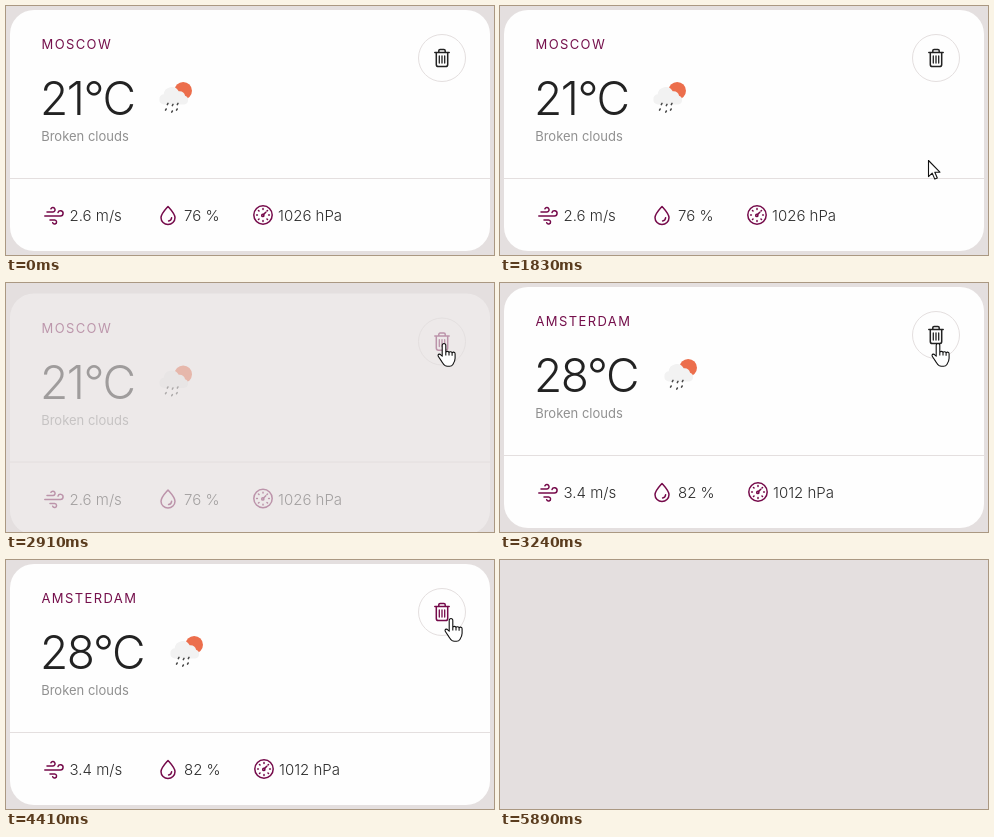
Write an HTML page that moves like this. It is 488 px wide and 249 px high and loops after 6350 ms.

```html
<!DOCTYPE html>
<html lang="en">
<head>
<meta charset="utf-8">
<title>Weather card</title>
<style>
  html, body { margin: 0; width: 100%; height: 100%; overflow: hidden; background: #e4dfdf; }
  svg { display: block; width: 488px; height: 249px; }
  text { font-family: Inter, "Liberation Sans", sans-serif; white-space: pre; }
  .city { font-size: 13px; letter-spacing: 1.4px; fill: #75104c; }
  .temp { font-size: 46px; font-weight: 300; letter-spacing: -1.4px; fill: #222; }
  .sky { font-size: 13px; fill: #909090; }
  .stat { font-size: 15px; font-weight: 300; fill: #2c2c2c; }
  .line { fill: none; stroke-width: 1.5; stroke-linecap: round; stroke-linejoin: round; }
  .plum { stroke: #750a4a; }
  .cursor { stroke: #111; stroke-width: 1.1; fill: #fff; stroke-linejoin: round; }
</style>
</head>
<body>
<svg viewBox="0 0 488 249" xmlns="http://www.w3.org/2000/svg">
  <g id="card">
    <rect x="4" y="4" width="480" height="241" rx="24" fill="#fefefe"/>
    <path d="M4 172.5H484" stroke="#e4dfdf"/>
    <text class="city" id="city" x="35.5" y="43"></text>
    <text class="temp" id="temp" x="34" y="109.3"></text>
    <text class="sky" x="35.2" y="135"></text>

    <g id="weather">
      <circle cx="177.2" cy="84.8" r="8.8" fill="#ec6e4c"/>
      <path fill="#f2f2f2" d="M158 98.5a5.2 5.2 0 0 1-.3-10.3a8 8 0 0 1 15-3
        a6 6 0 0 1 6.4 4.6a4.5 4.5 0 0 1-.9 8.7z"/>
      <path class="line" stroke="#484848" id="rain"/>
    </g>

    <g class="line plum">
      <path d="M41 206H47a2.2 2.2 0 1 0-2.1-3.2M38.8 210H54.5a2.6 2.6 0 1 0-2.5-3.4
        M44 214H48.6a2 2 0 1 1-1.9 2.7"/>
      <path d="M162 200.5c-3.2 3.6-7 7.4-7 11.3a7 6.7 0 0 0 14 0c0-3.9-3.8-7.7-7-11.3z
        M165.6 211.8a3.6 3.6 0 0 1-3 3.2"/>
      <g id="gauge">
        <circle cx="257" cy="209" r="9.2"/>
        <path id="ticks"/>
        <path d="M257.6 208.4L259.8 206.2"/>
        <circle cx="256.8" cy="209.4" r="1.1"/>
      </g>
    </g>
    <text class="stat" id="wind" x="63.5" y="215"></text>
    <text class="stat" id="humid" x="178" y="215"></text>
    <text class="stat" id="press" y="215"></text>

    <circle cx="436" cy="52" r="23.5" fill="none" stroke="#e4dfdf"/>
    <g class="line" id="bin">
      <path d="M428.8 46.5H443.2M432.8 46.3V44.8a1.3 1.3 0 0 1 1.3-1.3H437.9a1.3 1.3 0 0 1 1.3 1.3V46.3
        M430.3 46.5V58.4a2.2 2.2 0 0 0 2.2 2.2H439.5a2.2 2.2 0 0 0 2.2-2.2V46.5"/>
      <path d="M433.3 50V57M436 50V57M438.7 50V57" stroke-width="1.3"/>
    </g>
  </g>

  <path class="cursor" id="arrow" d="M.5 .5V16.6L4.2 13.1L6.8 19.1L9.3 18L6.8 12.2H11.9z"/>
  <path class="cursor" id="hand" d="M0 .5c-1.1 0-1.8.8-1.8 1.9V13.2L-3.2 11.8c-.9-1-2.3-.9-2.7.1
    c-.3.8.1 1.4.6 2.1L-2.2 18.6c1 1.4 1.5 2.6 3 3.8c.8.6 1.6.9 2.6.9H5.6c1.4 0 2.5-.6 3.3-1.8
    c1.2-1.8 2.2-3.6 2.2-6.2V10.7c0-2-2.7-2.1-3-.5c-.1-1.8-2.8-2-3.1-.5c-.2-1.7-2.9-1.8-3.2-.2V2.4
    C1.8 1.3 1.1.5 0 .5z M1.8 9.2V12.4M5 9.7V12.6M8.1 10.2V12.8"/>
</svg>
<script>
const LOOP = 6350;
const $ = id => document.getElementById(id);
const clamp = v => Math.min(1, Math.max(0, v));
const easeOut = p => 1 - Math.pow(1 - p, 1.7);
const smooth = p => p * p * (3 - 2 * p);
const linear = p => p;

const cities = [
  { city: "MOSCOW", temp: "21°C", wind: "2.6 m/s", humid: "76 %", press: "1026 hPa", shift: 0, nudge: 0 },
  { city: "AMSTERDAM", temp: "28°C", wind: "3.4 m/s", humid: "82 %", press: "1012 hPa", shift: 11, nudge: 1 }
];
document.querySelector(".sky").textContent = "Broken clouds";

// time, x, y, easing into the next key
const path = [
  [1340, 472, 236, easeOut], [1550, 428, 157, linear], [1829, 428, 157, linear],
  [1830, 428, 154, smooth], [2270, 438, 60, linear], [3590, 438, 60, smooth],
  [3880, 457, 193, smooth], [4220, 449, 71, easeOut], [4410, 445, 58, linear],
  [5600, 445, 58, smooth], [5890, 489, 251, linear]
];

// time, strength of the button highlight
const glow = [
  [2110, 0, linear], [2270, 1, linear], [3189, 1, linear], [3190, 0, linear],
  [3300, 0, linear], [3450, 1, linear], [3630, 1, linear], [3780, 0, linear],
  [4210, 0, linear], [4400, 1, linear]
];

function sample(keys, t, col) {
  const last = keys.length - 1;
  if (t <= keys[0][0]) return keys[0][col];
  for (let i = 0; i < last; i++) {
    const a = keys[i], b = keys[i + 1];
    if (t < b[0]) {
      const ease = a[a.length - 1];
      return a[col] + (b[col] - a[col]) * ease((t - a[0]) / (b[0] - a[0]));
    }
  }
  return keys[last][col];
}

const drops = [[162, 97.4], [167, 98.4], [172, 97.4], [160.2, 103], [166.4, 105], [171.2, 103]];
$("rain").setAttribute("d", drops.map(([x, y]) => `M${x} ${y}l-.7 1.2`).join(""));

let ticks = "";
for (let i = 0; i < 8; i++) {
  const a = Math.PI * i / 4, c = Math.cos(a), s = Math.sin(a);
  ticks += `M${257 + 5.6 * c} ${209 + 5.6 * s}L${257 + 6.4 * c} ${209 + 6.4 * s}`;
}
$("ticks").setAttribute("d", ticks);

let shown = -1;
function fill(n) {
  if (n === shown) return;
  shown = n;
  const c = cities[n];
  for (const id of ["city", "temp", "wind", "humid", "press"]) $(id).textContent = c[id];
  $("weather").setAttribute("transform", `translate(${c.shift} 0)`);
  $("gauge").setAttribute("transform", `translate(${c.nudge} 0)`);
  $("press").setAttribute("x", 272 + c.nudge);
}

function place(el, on, x, y) {
  el.setAttribute("visibility", on ? "visible" : "hidden");
  el.setAttribute("transform", `translate(${x} ${y})`);
}

function draw(t) {
  const second = t >= 3190;
  fill(second ? 1 : 0);

  const gone = easeOut(clamp((t - (second ? 5136 : 2772)) / 300));
  const card = $("card");
  card.setAttribute("opacity", 1 - gone);
  card.setAttribute("transform", `translate(0 ${10 * gone})`);

  const h = sample(glow, t, 1);
  const mix = (a, b) => Math.round(a + (b - a) * h);
  $("bin").setAttribute("stroke", `rgb(${mix(34, 117)},${mix(34, 10)},${mix(34, 74)})`);

  const x = sample(path, t, 1), y = sample(path, t, 2);
  const visible = t >= 1340 && t < 5890;
  const over = t < 5600 && Math.hypot(x - 436, y - 52) < 24;
  place($("arrow"), visible && !over, x, y);
  place($("hand"), visible && over, x, y);
}

const start = performance.now();
function tick() {
  draw((performance.now() - start) % LOOP);
  requestAnimationFrame(tick);
}
tick();
</script>
</body>
</html>
```
